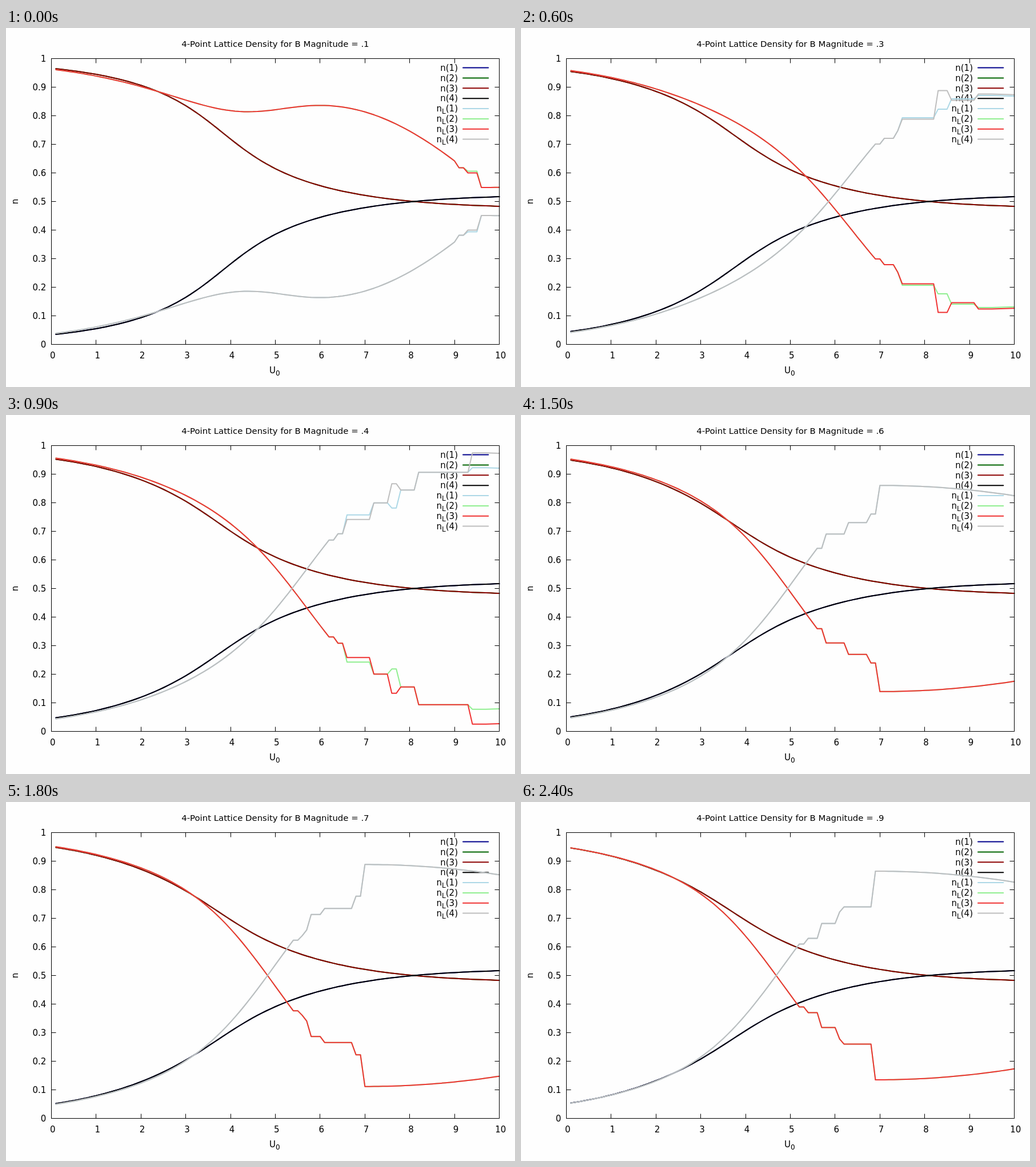
An HTML page for the animation above (2.7 s loop, 891x628 px).

```html
<!DOCTYPE html>
<html lang="en">
<head>
<meta charset="utf-8">
<title>Lattice density</title>
<style>
  html, body { margin: 0; width: 100%; height: 100%; overflow: hidden; background: #fefefe; }
  svg { display: block; width: 891px; height: 628px; }
  text { font: 15px "DejaVu Sans", sans-serif; fill: #000; }
  .title { font-size: 14.9px; }
  .sub { font-size: 12px; }
  .end { text-anchor: end; }
  .mid { text-anchor: middle; }
  .curve { fill: none; stroke-width: 2; stroke-linejoin: round; stroke-linecap: round; }
  .axis { fill: none; stroke: #000; stroke-width: 1; }
</style>
</head>
<body>
<svg id="stage" viewBox="0 0 891 628"></svg>
<script>
const STEP = 300, COUNT = 9;
const LEFT = 79.5, RIGHT = 863.5, TOP = 53.5, BOTTOM = 553.5;
const px = u => LEFT + u * (RIGHT - LEFT) / 10;
const py = n => BOTTOM - n * (BOTTOM - TOP);
const clamp = v => Math.max(0, Math.min(1, v));
const logistic = v => 1 / (1 + Math.exp(-v));
const softplus = v => Math.log(1 + Math.exp(v));
const stage = document.getElementById("stage");

function add(tag, attrs, content) {
  const el = document.createElementNS("http://www.w3.org/2000/svg", tag);
  for (const k in attrs) el.setAttribute(k, attrs[k]);
  if (content) el.innerHTML = content;
  return stage.appendChild(el);
}

// Exact density of sites 1 and 4: an S-curve, lower at small u in a weak field
function exact(b, u) {
  const lag = .23 * Math.pow(b, -.31);
  return .525 * logistic(.6 * (u - 3.5) + .24 + .12 * Math.exp(-u)
    - lag * (1 - Math.tanh((u - 3.8) / 1.3)));
}

// Lattice density before the stairs: steepens past a bend that moves left
// as the field grows, with a dip that fades as the field grows
function smooth(b, u) {
  const bend = 2 + 1.13 / b;
  const dip = 2.2 * Math.exp(12.5 * (.1 - b));
  return logistic(-3.3 + .42 * b + (.54 - .06 * b * b) * u
    + .287 * softplus((u - bend) / .7)
    - dip * logistic((u - 6.1 + 9 * b) / .8));
}

// Where the stairs begin, then each jump: u, rise of site 4, rise of site 1 if it differs
const stairs = [
  [9, [9, .024], [9.2, .018, .012], [9.5, .051, .057]],
  [8, [8.3, .05], [8.8, .06]],
  [6.9, [7, .02], [7.3, .027], [7.4, .04, .045], [8.2, .1, .03], [8.5, -.034, .036], [9.1, .022, .012]],
  [6.2, [6.3, .022], [6.5, .05, .066], [7.1, .058, .042], [7.5, .067, -.018],
    [7.7, -.022, .063], [8.1, .062], [9.3, .068, .016]],
  [6, [6.2, .014], [6.3, .018], [6.4, .028, -.008], [6.5, .02, .048], [6.8, .026, .032], [7, .042, .076]],
  [5.6, [5.7, .05], [6.2, .04], [6.7, .03], [6.9, .1]],
  [5.4, [5.5, .016], [5.6, .02], [5.7, .054], [6, .021], [6.7, .043], [6.9, .111]],
  [5.2, [5.5, .04], [5.7, .055], [6, .04], [6.7, .04], [6.9, .1]],
  [5.2, [5.3, .02], [5.6, .052], [6, .04], [6.1, .018], [6.8, .125]]
];

function lattice(field, u, site) {
  const [first, ...jumps] = stairs[field - 1];
  let n = smooth(field / 10, Math.min(u, first)), last = 0;
  for (const [at, rise, rise1 = rise] of jumps) {
    n += (site === 1 ? rise1 : rise) * clamp((u - at) / .1);
    last = at + .1;
  }
  return n - .004 * Math.max(0, u - last) ** 2;
}

// Sites 2 and 3 mirror sites 1 and 4
function density(field, series, u) {
  const site = series % 4 + 1, mirrored = site === 2 || site === 3;
  const n = series < 4 ? exact(field / 10, u) : lattice(field, u, site < 3 ? 1 : 4);
  return mirrored ? 1 - n : n;
}

function outline(field, series) {
  let d = "";
  for (let i = 1; i <= 100; i++)
    d += (i > 1 ? "L" : "M") + px(i / 10).toFixed(2) + " " + py(density(field, series, i / 10)).toFixed(2);
  return d;
}

// Key and curves, later series on top
const colors = ["#00008b", "#006400", "#8b0000", "#000000",
                "#add8e6", "#90ee90", "#f03232", "#bebebe"];
const curves = colors.map((stroke, i) => {
  const y = 69.6 + i * 17.86, site = `(${i % 4 + 1})`;
  add("text", { x: 791, y: Math.round(y + 5.2), class: "end" },
    i < 4 ? "n" + site : `n<tspan class="sub" dy="4">L</tspan><tspan dy="-4">${site}</tspan>`);
  add("path", { class: "curve", stroke, d: `M800 ${y}H844.3` });
  return add("path", { class: "curve", stroke });
});

// Frame, ticks and labels
let ticks = `M${LEFT} ${TOP}H${RIGHT}V${BOTTOM}H${LEFT}Z`;
for (let i = 0; i <= 10; i++) {
  const x = Math.floor(px(i)) + .5, y = py(i / 10);
  ticks += `M${x} ${BOTTOM}v-8M${x} ${TOP}v8M${LEFT} ${y}h8M${RIGHT} ${y}h-8`;
  add("text", { x: px(i) + 2.3, y: 578, class: "mid" }, String(i));
  add("text", { x: 70.3, y: y + 5.5, class: "end" }, String(i / 10));
}
add("path", { class: "axis", d: ticks });
add("text", { x: 461, y: 603.5 }, 'U<tspan class="sub" dy="4">0</tspan>');
add("text", { class: "mid", transform: "translate(20.5 303.5) rotate(-90)" }, "n");
const title = add("text", { x: 471.4, y: 33, class: "title mid" });

let shown = 0;
function draw(time) {
  const field = Math.floor(time / STEP) % COUNT + 1;
  if (field === shown) return;
  shown = field;
  title.textContent = "4-Point Lattice Density for B Magnitude = ." + field;
  curves.forEach((c, i) => c.setAttribute("d", outline(field, i)));
}
const start = performance.now();
function tick() {
  draw(performance.now() - start);
  requestAnimationFrame(tick);
}
tick();
</script>
</body>
</html>
```
